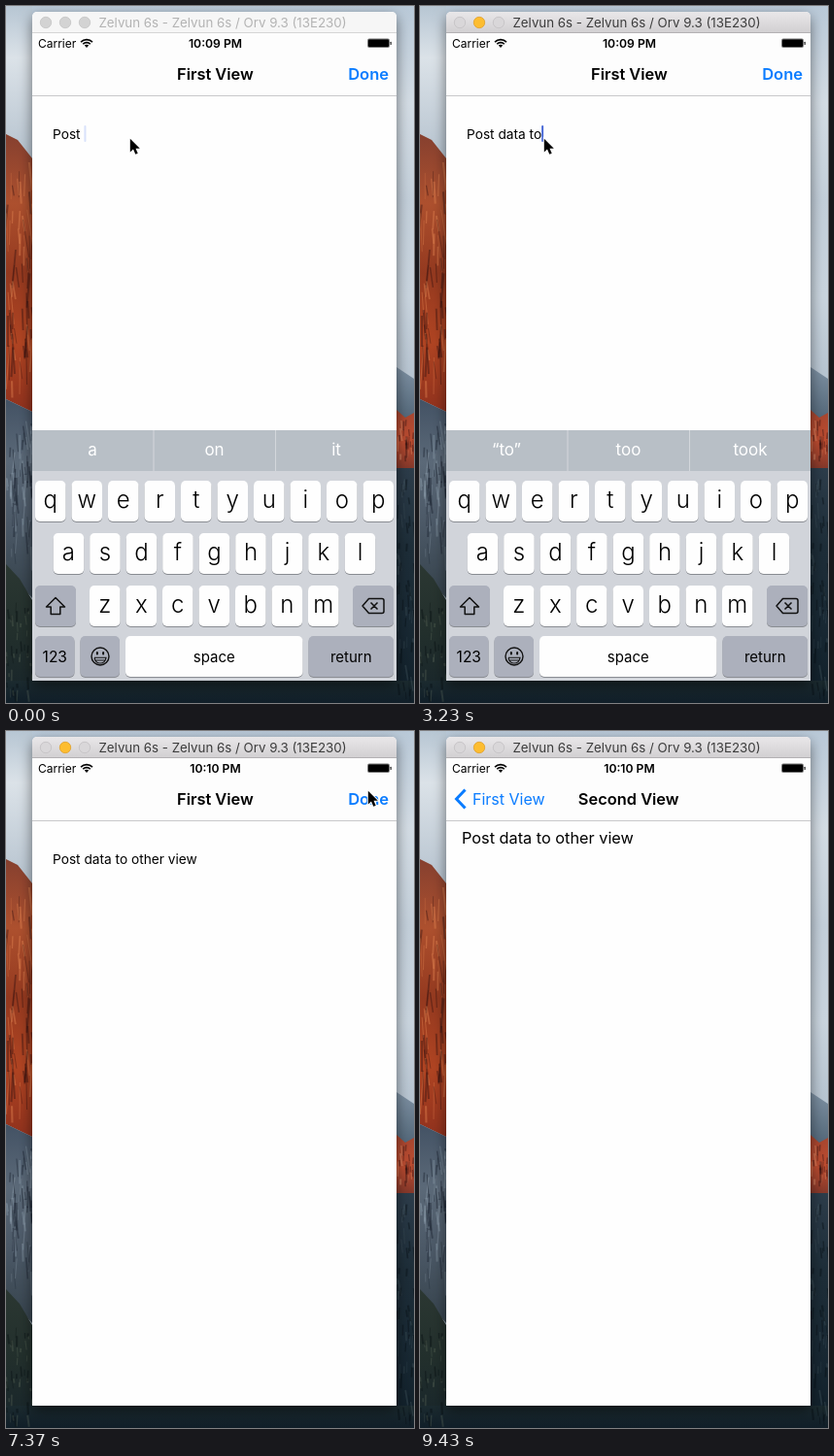
Animation of 420 by 718 pixels, one loop 9.88 s. Source, as an HTML page with a canvas:

```html
<!DOCTYPE html>
<html lang="en">
<head>
<meta charset="utf-8">
<title>Passing text between views</title>
<style>
html, body { margin: 0; width: 100%; height: 100%; overflow: hidden; }
canvas { display: block; }
</style>
</head>
<body>
<canvas id="stage" width="420" height="718"></canvas>
<script>
const ctx = document.getElementById('stage').getContext('2d');
const LOOP = 9880, STEPS = 67;
const BLUE = '#0a7cff';
const LEFT = 27, TOP = 28, WIDTH = 375, HEIGHT = 667;

// [step, typed text, suggestions]
const typing = [
  [0, 'Post ', 'a|on|it'],
  [11, 'Post d', 'a|on|it'],
  [12, 'Post da', '“d”|do|don\'t'],
  [13, 'Post dat', '“d”|do|don\'t'],
  [14, 'Post data', '“d”|do|don\'t'],
  [15, 'Post data', '“data”|date|dates'],
  [17, 'Post data ', 'is|and|from'],
  [20, 'Post data t', '“t”|to|the'],
  [22, 'Post data to', '“to”|too|took'],
  [24, 'Post data to ', 'the|be|get'],
  [25, 'Post data to o', '“o”|on|our'],
  [26, 'Post data to ot', '“ot”|other|others'],
  [27, 'Post data to oth', '“oth”|other|others'],
  [28, 'Post data to othe', '“othe”|other|others'],
  [29, 'Post data to other', '“other”|others|otherwise'],
  [30, 'Post data to other ', 'people|countries|girls'],
  [32, 'Post data to other v', '“v”|very|video'],
  [33, 'Post data to other vi', '“vi”|video|visit'],
  [35, 'Post data to other vie', '“vie”|view|views'],
  [36, 'Post data to other view', '“view”|views|viewers']
];

// [step, x, y] of the pointer tip
const pointerPath = [
  [0, 127, 136], [36, 127, 136], [39, 160, 392], [41, 162, 405], [44, 162, 405],
  [48, 370, 62], [50, 372, 61], [54, 369, 66], [56, 366, 100], [59, 346, 306],
  [61, 350, 420], [63, 392, 664]
];

const clamp = v => Math.max(0, Math.min(1, v));
const lastBefore = (list, step) => list.filter(k => k[0] <= step).pop();

function rect(x, y, w, h, fill, r = 0) {
  ctx.fillStyle = fill;
  ctx.beginPath();
  ctx.roundRect(x, y, w, h, r);
  ctx.fill();
}

function poly(points, fill) {
  ctx.fillStyle = fill;
  ctx.fill(new Path2D('M' + points + 'Z'));
}

function line(d, color, width) {
  ctx.strokeStyle = color;
  ctx.lineWidth = width;
  ctx.stroke(new Path2D(d));
}

function text(str, x, y, size, { color = '#000', weight = 400, align = 'left', alpha = 1 } = {}) {
  ctx.save();
  ctx.globalAlpha *= alpha;
  ctx.font = `${weight} ${size}px Inter, sans-serif`;
  ctx.textAlign = align;
  ctx.fillStyle = color;
  ctx.fillText(str, x, y);
  const width = ctx.measureText(str).width;
  ctx.restore();
  return width;
}

function vertical(y0, y1, ...colors) {
  const g = ctx.createLinearGradient(0, y0, 0, y1);
  colors.forEach((c, i) => g.addColorStop(i / (colors.length - 1), c));
  return g;
}

// Seeded cracks and highlights for rock and grass
function streaks(x, y, w, h, count, length, dark, light) {
  let seed = 7 + x + y;
  const random = () => (seed = seed * 16807 % 2147483647) / 2147483647;
  for (let i = 0; i < count; i++) {
    const size = length * (0.3 + random());
    const sx = x + random() * w, sy = y + random() * (h - size);
    line(`M${sx} ${sy}l${size * (random() - 0.4) * 0.3} ${size}`, random() < 0.6 ? dark : light, 0.6 + random() * 1.6);
  }
}

function drawWallpaper() {
  rect(0, 0, 420, 718, vertical(0, 400, '#b9c9d8', '#d3dce4', '#c3cfda', '#c9d4de', '#b2c0cd'));
  rect(0, 0, 27, 160, vertical(0, 160, '#b7c6d3', '#dbe2e8', '#c8d2db', '#b5c2ce'));
  poly('0 132 12 138 27 157 27 418 0 405', vertical(132, 418, '#86402f', '#ad502e', '#94391f', '#b04422', '#8f311d'));
  streaks(0, 160, 27, 245, 60, 34, 'rgba(45,14,14,.4)', 'rgba(232,138,84,.4)');
  poly('0 405 27 418 27 610 0 580', vertical(405, 600, '#435264', '#5b6978', '#4b5866', '#38454f'));
  streaks(0, 425, 27, 160, 60, 22, 'rgba(20,28,40,.4)', 'rgba(150,165,180,.35)');
  poly('0 575 14 590 27 612 27 718 0 718', vertical(575, 718, '#2b3732', '#222f2c', '#17242a'));
  poly('402 372 420 384 420 430 402 420', vertical(372, 425, '#7d90a2', '#536779'));
  poly('402 416 411 424 420 419 420 480 402 478', vertical(416, 480, '#a5452f', '#bd4c30', '#7c3529'));
  streaks(402, 424, 18, 52, 22, 12, 'rgba(45,14,14,.4)', 'rgba(240,160,120,.4)');
  rect(402, 476, 18, 242, vertical(476, 718, '#2c3c4a', '#1d2d38', '#182833', '#101f29'));
  rect(0, 695, 420, 23, vertical(695, 718, '#1b2a2f', '#101e28'));
  streaks(402, 480, 18, 238, 50, 14, 'rgba(5,12,18,.4)', 'rgba(90,110,120,.25)');
  streaks(0, 610, 27, 108, 40, 10, 'rgba(5,12,14,.4)', 'rgba(110,125,105,.25)');
}

function drawWindow(active) {
  ctx.save();
  ctx.shadowColor = 'rgba(0,0,0,.5)';
  ctx.shadowBlur = 14;
  ctx.shadowOffsetY = 5;
  rect(LEFT, 6, WIDTH, 689, '#fefefe', [5, 5, 0, 0]);
  ctx.restore();
  rect(LEFT, 6, WIDTH, 22, active ? vertical(6, 28, '#e9e7e9', '#d1cfd1') : '#f6f6f6', [5, 5, 0, 0]);
  rect(LEFT, 27, WIDTH, 1, active ? '#b3b1b3' : '#d5d5d5');
  [41, 61, 81].forEach((x, i) => {
    const lit = active && i === 1;
    ctx.beginPath();
    ctx.arc(x, 17, 5.7, 0, 7);
    ctx.fillStyle = lit ? '#fdbd30' : active ? '#d9d7d9' : '#d3d3d3';
    ctx.fill();
    ctx.lineWidth = 0.8;
    ctx.strokeStyle = lit ? '#e0a02a' : active ? '#c3c1c3' : '#c4c4c4';
    ctx.stroke();
  });
  text('Zelvun 6s - Zelvun 6s / Orv 9.3 (13E230)', 223, 22, 13.3,
    { color: active ? '#3c3c3c' : '#b3b3b3', align: 'center' });
}

function drawStatus(step) {
  text('Carrier', 33, 42.5, 12);
  text(step < 24 ? '10:09 PM' : '10:10 PM', 215.5, 42.5, 12.2, { weight: 600, align: 'center' });
  [5.3, 8.4].forEach(r => {
    ctx.beginPath();
    ctx.arc(83, 43, r, -Math.PI * 0.75, -Math.PI * 0.25);
    ctx.lineWidth = 1.7;
    ctx.strokeStyle = '#000';
    ctx.stroke();
  });
  poly('83 43 80.8 40.6 Q83 38.9 85.2 40.6', '#000');
  rect(372, 33.5, 23, 9.5, '#777', 2);
  rect(373, 34.5, 21, 7.5, '#000', 1);
  rect(395.5, 36.7, 1.3, 3.4, '#333', 0.6);
}

function drawNavBar(step, push) {
  rect(LEFT, TOP, WIDTH, 64, push > 0 && push < 1 ? '#f9f9f9' : '#fdfdfd');
  rect(LEFT, 92, WIDTH, 1, '#c8c8ca');
  drawStatus(step);
  const back = clamp((push - 0.7) / 0.3);
  const fadeIn = back * 0.4 + back ** 4 * 0.6;
  const labelX = 54 + 122 * (1 - push);
  text('First View', labelX, 76, 16.4, { weight: 600, alpha: push ? (1 - push) * 0.6 : 1 });
  text('First View', labelX, 76, 16, { color: BLUE, alpha: fadeIn });
  const tapped = step === 48 || step === 51;
  text('Done', 394, 76, 16.5, {
    color: BLUE, weight: 600, align: 'right',
    alpha: push ? (1 - push) * 0.6 : tapped ? 0.35 : 1
  });
  ctx.save();
  ctx.globalAlpha = fadeIn;
  line('M46.5 60.5L37.5 70L46.5 79.5', BLUE, 3);
  ctx.restore();
  text('Second View', 214.7 + 280 * (1 - push), 76, 16.4, { weight: 600, align: 'center', alpha: push });
}

function drawFirstView(step, typed, push) {
  ctx.save();
  ctx.translate(-0.3 * WIDTH * push, 0);
  const width = text(typed, 48, 137, 13.7);
  const held = typing.some(k => k[0] > 0 && step - k[0] >= 0 && step - k[0] < 3);
  const blink = held || step % 7 < 4;
  if (step < 43 && blink) {
    rect(48 + width, 123, 2, 17, step === 0 ? '#d9e2fb' : '#4768d6', 1);
  }
  ctx.restore();
}

function drawSecondView(push) {
  const x = LEFT + WIDTH * (1 - push);
  rect(LEFT, 93, x - LEFT, 602, `rgba(0,0,0,${0.082 * clamp(push * 4)})`);
  if (push < 1) rect(x - 4, 93, 4, 602, 'rgba(0,0,0,.05)');
  rect(x, 93, WIDTH, 602, '#fefefe');
  text('Post data to other view', x + 16, 116, 16.3);
}

function key(x, y, w, label, size, { dark, weight } = {}) {
  rect(x, y + 1, w, 42, '#898c92', 5);
  rect(x, y, w, 42, dark ? '#acb0bc' : '#fefefe', 5);
  text(label, x + w / 2, y + (size > 20 ? 27.5 : 26.5), size, { align: 'center', weight });
}

function drawKeyboard(suggestions) {
  rect(LEFT, 437, WIDTH, 258, '#d1d4da');
  rect(LEFT, 437, WIDTH, 42, '#b8bfc6');
  suggestions.split('|').forEach((word, i) => {
    text(word, 89 + 125.5 * i, 462.5, 17, { color: '#fff', align: 'center' });
    if (i) rect(26 + 125.5 * i, 437, 1, 42, '#d3d7dc');
  });
  [['qwertyuiop', 30], ['asdfghjkl', 48.7], ['zxcvbnm', 86]].forEach(([letters, x], row) =>
    [...letters].forEach((c, i) => key(x + 37.5 * i, 489 + 54 * row, 31.5, c, 24, { weight: 300 })));
  const dark = { dark: true };
  key(30, 597, 42, '', 15, dark);
  key(357, 597, 42, '', 15, dark);
  key(30, 649, 40.5, '123', 15.5, dark);
  key(76.5, 649, 40.5, '', 15, dark);
  key(123, 649, 182.5, 'space', 15);
  key(311.5, 649, 87.5, 'return', 15, dark);
  ctx.lineJoin = 'round';
  line('M51 609.5L60.5 619H55.8V626.5H46.2V619H41.5Z', '#111', 1.5);
  line('M373.5 610.5H387Q389 610.5 389 612.5V623.5Q389 625.5 387 625.5H373.5L367 618ZM375.5 614.5L382.5 621.5M382.5 614.5L375.5 621.5', '#111', 1.5);
  ctx.lineJoin = 'miter';
  line('M106 670A9 9 0 1 1 88 670A9 9 0 1 1 106 670', '#111', 1.4);
  line('M91 671.3H103Q102 677 97 677Q92 677 91 671.3M92 674H102', '#111', 1.1);
  rect(92.9, 665, 2, 3.6, '#111', 1);
  rect(99.1, 665, 2, 3.6, '#111', 1);
}

function drawPointer(step) {
  if (step > 63) return;
  const from = lastBefore(pointerPath, step);
  const to = pointerPath.find(k => k[0] > step) || from;
  const p = (step - from[0]) / (to[0] - from[0] || 1);
  ctx.save();
  ctx.translate(from[1] + (to[1] - from[1]) * p, from[2] + (to[2] - from[2]) * p);
  const arrow = 'M.8 .8V14.6L4 11.6L6.3 16.8L8.7 15.8L6.5 10.7H10.8Z';
  line(arrow, '#fff', 2);
  ctx.fillStyle = '#000';
  ctx.fill(new Path2D(arrow));
  ctx.restore();
}

function draw(now) {
  const step = Math.min(STEPS - 1, Math.floor((now % LOOP + 20) / LOOP * STEPS));
  const [, typed, suggestions] = lastBefore(typing, step);
  const time = step * LOOP / STEPS;
  const push = 1 - (1 - clamp((time - 7620) / 870)) ** 3;
  const slide = clamp((step - 47) / 3);

  drawWallpaper();
  drawWindow(step >= 6);
  ctx.save();
  ctx.beginPath();
  ctx.rect(LEFT, TOP, WIDTH, HEIGHT);
  ctx.clip();
  drawFirstView(step, typed, push);
  if (push > 0) drawSecondView(push);
  drawNavBar(step, push);
  ctx.translate(0, 258 * slide * (2 - slide));
  if (slide < 1) drawKeyboard(suggestions);
  ctx.restore();
  drawPointer(step);
  requestAnimationFrame(draw);
}
requestAnimationFrame(draw);
</script>
</body>
</html>
```
